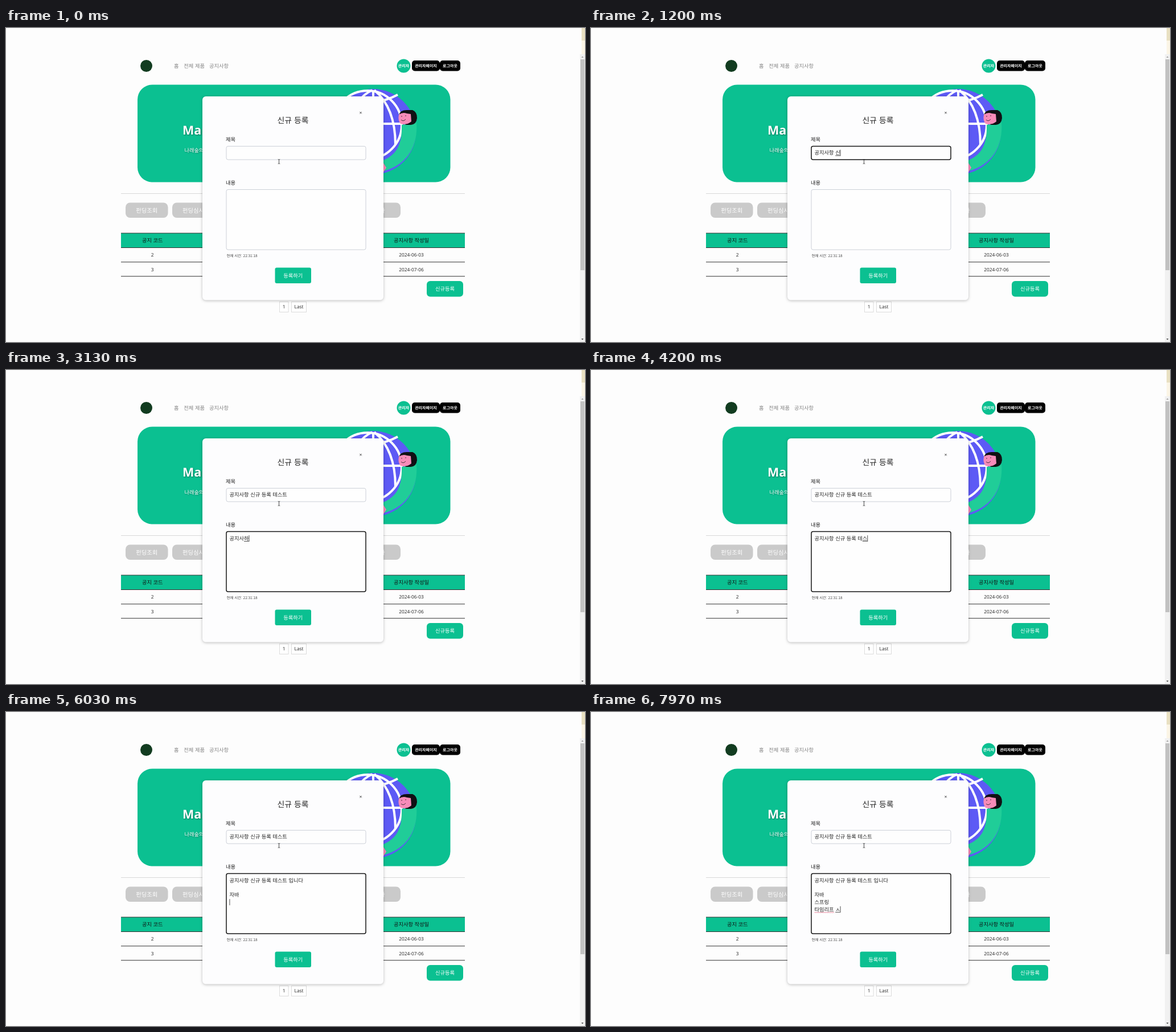
Animation, 1017 px wide and 551 px high, one loop 8 s. Source, as an HTML page:

```html
<!DOCTYPE html>
<html lang="ko">
<head>
<meta charset="utf-8">
<title>신규 등록</title>
<style>
  html, body { margin: 0; width: 100%; height: 100%; overflow: hidden; background: #fdfdfd; }
  svg { display: block; width: 1017px; height: 551px; }
  text {
    font: 9.25px "Noto Sans CJK KR", "Noto Sans CJK", sans-serif;
    fill: #222; white-space: pre; text-rendering: geometricPrecision;
  }
  .mid { text-anchor: middle; }
  .latin { font-family: "Open Sans", "Noto Sans", sans-serif; font-size: 8.3px; }
  .menu { fill: #858585; }
  .tab { font-size: 10.3px; fill: #fff; }
  .pill { font-size: 7px; font-weight: 700; fill: #fff; }
  .cta { font-weight: 500; fill: #fff; }
  .head { font-weight: 500; fill: #111; }
  .hero { fill: #fff; filter: drop-shadow(1px 1px 1px #0006); }
  .green { fill: #0bc091; }
  .grey { fill: #cacaca; }
  .globe { fill: none; stroke: #fff; stroke-width: 4; }
  .rule { stroke: #333; stroke-width: 1; }
  .page { fill: #fff; stroke: #dcdcdc; }
  .field { fill: #fefefe; stroke: #ccd0d8; stroke-width: 1; }
  .field.on { stroke: #151515; stroke-width: 1.5; }
  .modal { fill: #fdfdfe; filter: drop-shadow(0 1px 2.5px #0004); }
  .mark { stroke: #222; stroke-width: .8; fill: none; }
  .wavy { stroke: #e0607c; stroke-width: .8; fill: none; }
</style>
</head>
<body>
<svg viewBox="0 0 1017 551">
  <!-- window edge and scrollbar -->
  <rect x="1011" width="6" height="22" fill="#e9e0c2"/>
  <rect x="1011" y="22" width="6" height="24" fill="#fbf5e6"/>
  <rect x="1008" y="46" width="9" height="505" fill="#f1f1f1"/>
  <rect x="1009" y="55" width="7" height="370" fill="#c1c1c1"/>
  <path d="M1010.500 52l2-2.500 2 2.500z" fill="#a0a0a0"/>
  <path d="M1010.500 545l2 2.500 2-2.500z" fill="#505050"/>

  <!-- navigation -->
  <circle cx="246.500" cy="66.500" r="10.500" fill="#123c20"/>
  <text class="menu" x="295" y="69.500">홈</text>
  <text class="menu" x="312.300" y="69.500">전체 제품</text>
  <text class="menu" x="357" y="69.500">공지사항</text>
  <circle class="green" cx="698.500" cy="66.500" r="12"/>
  <text class="pill mid" x="698.500" y="69">관리자</text>
  <rect x="713" y="57" width="49" height="18.500" rx="5"/>
  <text class="pill mid" x="737.500" y="69">관리자페이지</text>
  <rect x="762" y="57" width="36" height="18.500" rx="5"/>
  <text class="pill mid" x="780" y="69">로그아웃</text>

  <!-- banner -->
  <rect class="green" x="231" y="99.500" width="549.500" height="171" rx="26"/>
  <circle cx="645" cy="182" r="75" fill="#5d5af5"/>
  <g class="globe">
    <circle cx="635" cy="170" r="60"/>
    <path d="M645 109V250M647 109Q684 140 684 205M643 109Q613 124 606 160M616 122Q650 138 688 117M600 168H694"/>
  </g>
  <path d="M721 166C724 205 706 240 663 251V232C686 222 696 205 695 170z" fill="#20cd98"/>
  <path d="M663 237l5 8-5 8z" fill="#f585b5"/>
  <path d="M690 153Q692 144 704 144H714Q722 147 722 158 721 169 711 170H702z" fill="#101014"/>
  <path d="M690 152Q697 147 704 150L711 151 712 164Q704 171 693 168 688 162 690 152z" fill="#f78bb9"/>
  <path class="mark" d="M694 161q4 4 8-1M695 154v2M702 153v2"/>
  <text class="hero latin" x="310" y="187" style="font-size:21.500px;font-weight:700">Market</text>
  <text class="hero" x="313.500" y="218.300">나래숲의</text>

  <!-- tabs -->
  <path d="M202 290.500H806" stroke="#d8d8d8"/>
  <rect class="grey" x="210" y="306.500" width="74.500" height="26.500" rx="8"/>
  <text class="tab mid" x="247.300" y="323.700">펀딩조회</text>
  <rect class="grey" x="292" y="306.500" width="74.500" height="26.500" rx="8"/>
  <text class="tab" x="310" y="323.700">펀딩심사</text>
  <rect class="grey" x="618" y="306.500" width="75" height="26.500" rx="8"/>
  <text class="tab" x="665.500" y="323.700" text-anchor="end">조사</text>

  <!-- table -->
  <rect class="green" x="202" y="360" width="604" height="25.500"/>
  <path class="rule" d="M202 360H806M202 385.500H806M202 410.700H806M202 435.700H806"/>
  <text class="head mid" x="257.200" y="375.800">공지 코드</text>
  <text class="head mid" x="712" y="375.800">공지사항 작성일</text>
  <text class="latin mid" x="257" y="401">2</text>
  <text class="latin mid" x="712" y="401">2024-06-03</text>
  <text class="latin mid" x="257" y="426.500">3</text>
  <text class="latin mid" x="712" y="426.500">2024-07-06</text>
  <rect class="green" x="739" y="444" width="64" height="27.500" rx="6"/>
  <text class="cta mid" x="771" y="461.300">신규등록</text>
  <rect class="page" x="480.500" y="480.500" width="15.500" height="18"/>
  <text class="latin mid" x="488.200" y="492.300">1</text>
  <rect class="page" x="501.500" y="480.500" width="26" height="18"/>
  <text class="latin mid" x="514.500" y="492.300">Last</text>

  <!-- dialog -->
  <rect class="modal" x="345" y="120" width="318" height="357.500" rx="6"/>
  <path class="mark" d="M621.300 147l3.400 3.400m0-3.400l-3.400 3.400"/>
  <text class="mid" x="504" y="166.500" style="font-size:13.850px">신규 등록</text>
  <text x="386" y="198.800">제목</text>
  <rect id="titleBox" class="field" x="387" y="207.500" width="245" height="23.500" rx="3"/>
  <text x="386" y="275.300">내용</text>
  <rect id="bodyBox" class="field" x="387" y="283.500" width="245" height="105.500" rx="3"/>
  <text x="387.500" y="402" style="font-size:6.450px;fill:#444">현재 시간: 22:31:18</text>
  <rect class="green" x="472.500" y="420.500" width="63.500" height="27.500" rx="3"/>
  <text class="cta mid" x="504.200" y="437.800">등록하기</text>

  <g id="typed"></g>
  <path id="wavy" class="wavy"/>
  <path id="under" class="mark"/>
  <path id="caret" class="mark"/>
  <path class="mark" d="M477.800 230.500q1.700 0 1.700 1 0-1 1.700-1M479.500 231.500v6M477.800 238.300q1.700 0 1.700-1 0 1 1.700 1"/>
</svg>
<script>
const LOOP = 8000, LEFT = 392.5, LINE = 12.7;
const LEADS = 'ㄱㄲㄴㄷㄸㄹㅁㅂㅃㅅㅆㅇㅈㅉㅊㅋㅌㅍㅎ';
const TAILS = ' ㄱㄲㄳㄴㄵㄶㄷㄹㄺㄻㄼㄽㄾㄿㅀㅁㅂㅄㅅㅆㅇㅈㅊㅋㅌㅍㅎ';
const BASE = 0xAC00;
const $ = id => document.getElementById(id);

// What a two-set Korean keyboard shows after each key press.
function keystrokes(text) {
  const steps = [];
  let done = '';
  const add = (shown, composing) => steps.push({ shown, composing });
  for (const c of text) {
    const code = c.charCodeAt(0) - BASE;
    if (c === ' ' || c === '\n') add(done + c, false);
    else if (code < 0) add(done + c, true);
    else {
      const lead = LEADS[Math.floor(code / 588)], tail = code % 28;
      const prev = done.charCodeAt(done.length - 1) - BASE;
      const borrowed = TAILS.indexOf(lead);
      if (prev >= 0 && prev % 28 === 0 && borrowed > 0)
        add(done.slice(0, -1) + String.fromCharCode(BASE + prev + borrowed), true);
      else add(done + lead, true);
      add(done + String.fromCharCode(BASE + code - tail), true);
      if (tail) add(done + c, true);
    }
    done += c;
  }
  return steps;
}

const run = (start, gap, text) => ({ start, gap, text, steps: keystrokes(text) });
const fields = [
  { box: $('titleBox'), y: 222.4, from: 340, to: 2200,
    runs: [run(430, 56, '공지사항 신규 등록 테스트')] },
  { box: $('bodyBox'), y: 298.9, from: 2200, to: LOOP,
    runs: [
      run(2650, 56, '공지사항 신규 등록 테스트 입니다'),
      run(4950, 130, '\n\n'),
      run(5330, 130, '자바\n'),
      run(6200, 85, '스프링\n'),
      run(6980, 94, '타임리프 ㅅ')
    ] }
];

for (const f of fields) {
  f.lines = Array.from({ length: 5 }, (_, i) => {
    const el = document.createElementNS('http://www.w3.org/2000/svg', 'text');
    el.setAttribute('x', LEFT);
    el.setAttribute('y', f.y + i * LINE);
    $('typed').append(el);
    return el;
  });
}

function stateAt(f, t) {
  let text = '', composing = false, last = f.from;
  for (const r of f.runs) {
    if (t < r.start) break;
    const n = Math.min(Math.floor((t - r.start) / r.gap), r.steps.length - 1);
    const step = r.steps[n];
    composing = step.composing && t < f.to;
    last = r.start + n * r.gap;
    text += step.shown;
  }
  return { text, composing, last };
}

const width = (el, s) => s ? el.getSubStringLength(0, s.length) : 0;

function wave(x, end, y) {
  let d = `M${x} ${y}`;
  for (let i = 0; x < end; i++) d += `L${x += 1.5} ${y + (i % 2 ? 0 : 1)}`;
  return d;
}

function draw(t) {
  let caret = '', under = '', wavy = '';
  for (const f of fields) {
    const s = stateAt(f, t), rows = s.text.split('\n');
    const on = t >= f.from && t < f.to;
    f.box.classList.toggle('on', on);
    f.lines.forEach((el, i) => {
      const row = rows[i] || '';
      if (el.textContent !== row) el.textContent = row;
    });
    const n = rows.length - 1, row = rows[n], el = f.lines[n], y = f.y + n * LINE;
    if (row.startsWith('타임리프 '))
      wavy = wave(LEFT, LEFT + width(el, '타임리프'), y + 1.6);
    if (!on) continue;
    const x = LEFT + width(el, row);
    if (s.composing) under = `M${LEFT + width(el, row.slice(0, -1))} ${y + 1.6}H${x}`;
    if ((t - s.last) % 1000 < 500) caret = `M${x + .4} ${y - 8.8}v11`;
  }
  $('caret').setAttribute('d', caret);
  $('under').setAttribute('d', under);
  $('wavy').setAttribute('d', wavy);
}

const began = performance.now();
function tick() {
  draw((performance.now() - began) % LOOP);
  requestAnimationFrame(tick);
}
tick();
</script>
</body>
</html>
```
